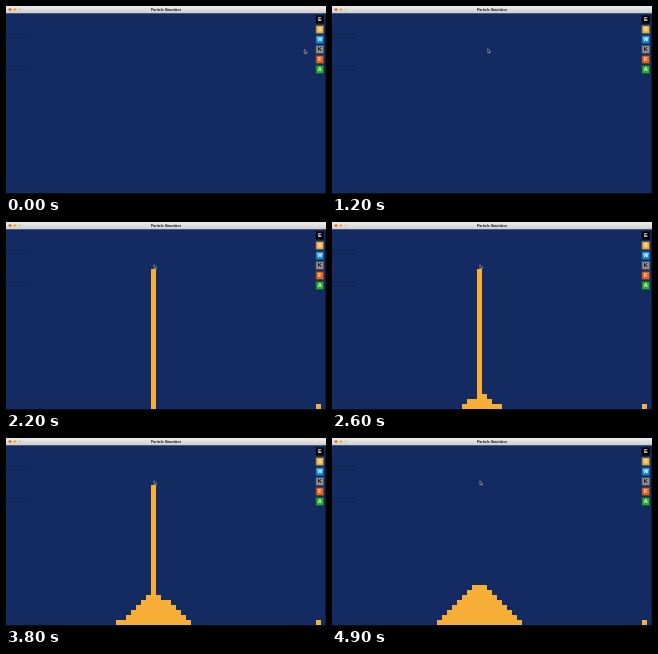
Recreate the animation shown at these times as an HTML page with a canvas. Size 320x188 px, loop 5 s.

```html
<!DOCTYPE html>
<html lang="en">
<head>
<meta charset="utf-8">
<title>Particle Simulator</title>
<style>
  html, body { margin: 0; width: 100%; height: 100%; overflow: hidden; background: #142b62; }
  canvas { display: block; width: 320px; height: 188px; }
</style>
</head>
<body>
<canvas id="stage"></canvas>
<script>
const LOOP = 5000, TICK = 100;
const CELL = 5, FLOOR = 187, LEFT = 90, COLS = 24;
const SPOUT_COL = 11, SPOUT_ROW = 28;
const POUR_START = 1260, POUR_END = 3925, STEP = 100 / 3;
const SAND = '#f6ae37';
const FONT = '"Liberation Sans", sans-serif';

const POINTER = [
  [100, 298.3, 43.4],
  [500, 314, 23.6],
  [700, 314, 23.6],
  [1100, 178, 42.7],
  [1250, 148, 42.7]
];

const BUTTONS = [
  ['E', '#000000', '#ffffff'],
  ['S', '#edb343', '#fff3d0'],
  ['W', '#1c8fe3', '#ffffff'],
  ['K', '#929292', '#0c0c0c'],
  ['F', '#e9641f', '#fff0e0'],
  ['A', '#2bb02f', '#ffffff']
];

const canvas = document.getElementById('stage');
const ctx = canvas.getContext('2d');
const ratio = window.devicePixelRatio || 1;
canvas.width = 320 * ratio;
canvas.height = 188 * ratio;
ctx.scale(ratio, ratio);

function seeded(seed) {
  return () => {
    seed = (seed * 16807) % 2147483647;
    return seed / 2147483647;
  };
}

function pointerAt(t) {
  const i = POINTER.findIndex(k => k[0] > t);
  if (i < 1) return POINTER.at(i).slice(1);
  const [t0, x0, y0] = POINTER[i - 1], [t1, x1, y1] = POINTER[i];
  const p = (t - t0) / (t1 - t0), e = p * p * (3 - 2 * p);
  return [x0 + (x1 - x0) * e, y0 + (y1 - y0) * e];
}

// A grain rolls down one side until the next column is no lower.
function dropGrain(heights, random) {
  let col = SPOUT_COL + (random() < 0.5 ? 0 : 1);
  const lower = dir => heights[col + dir] < heights[col];
  let dir = random() < 0.5 ? -1 : 1;
  if (!lower(dir)) dir = -dir;
  while (lower(dir)) col += dir;
  heights[col]++;
}

function sandAt(t) {
  const steps = since => Math.max(0, Math.floor((t - since) / STEP));
  const poured = steps(POUR_START) - steps(POUR_END);
  const top = SPOUT_ROW - steps(POUR_END);
  const front = SPOUT_ROW - steps(POUR_START);
  const heights = Array(COLS).fill(0);
  const random = seeded(2024);
  const landed = () => poured - Math.max(0, top - heights[SPOUT_COL]);
  for (let n = 0; n < landed(); n++) dropGrain(heights, random);
  return { heights, top, front };
}

function rect(x, y, w, h, color) {
  ctx.fillStyle = color;
  ctx.fillRect(x, y, w, h);
}

function text(str, x, y, size, color) {
  ctx.font = `bold ${size}px ${FONT}`;
  ctx.fillStyle = color;
  ctx.textAlign = 'center';
  ctx.textBaseline = 'middle';
  ctx.fillText(str, x, y);
}

function drawWindow() {
  rect(0, 0, 320, 188, '#142b62');
  for (const y of [28, 31, 60, 63]) rect(0, y, 23, 1, 'rgba(5,14,45,.28)');
  rect(0, 187, 320, 1, '#080f26');
  rect(319.5, 7, 0.5, 181, '#080f26');

  const bar = ctx.createLinearGradient(0, 0, 0, 7);
  bar.addColorStop(0, '#eeeeec');
  bar.addColorStop(1, '#cfcfcd');
  rect(0, 0, 320, 7, bar);
  rect(0, 7, 320, 0.5, '#7c8090');
  ['#f0694f', '#f3b13f', '#cfd0c8'].forEach((color, i) => {
    ctx.fillStyle = color;
    ctx.beginPath();
    ctx.arc(4 + i * 5, 3.5, 1.6, 0, Math.PI * 2);
    ctx.fill();
  });
  text('Particle Simulator', 160, 3.6, 3.55, '#111111');
}

function drawButtons() {
  ctx.strokeStyle = 'rgba(10,16,35,.5)';
  ctx.lineWidth = 0.6;
  BUTTONS.forEach(([letter, color, ink], i) => {
    const y = 9.5 + i * 10;
    rect(309.8, y, 8, 8, color);
    ctx.strokeRect(310.1, y + 0.3, 7.4, 7.4);
    text(letter, 313.8, y + 4.2, 5.6, ink);
  });
}

function drawSand(t) {
  if (t < POUR_START) return;
  rect(310, 182, CELL, CELL, SAND);
  const { heights, top, front } = sandAt(t);
  const stack = (col, low, high) => {
    if (high > low) rect(LEFT + col * CELL, FLOOR - high * CELL, CELL, (high - low) * CELL, SAND);
  };
  heights.forEach((h, col) => stack(col, 0, h));
  stack(SPOUT_COL, Math.max(0, front), top);
}

function drawPointer(x, y) {
  ctx.beginPath();
  [[0, 0], [0, 4], [0.9, 3.3], [1.5, 4.6], [2.2, 4.3], [1.6, 3], [2.8, 2.9]]
    .forEach(([dx, dy]) => ctx.lineTo(x + dx, y + dy));
  ctx.closePath();
  ctx.fillStyle = '#080808';
  ctx.fill();
  ctx.strokeStyle = '#d4d8e2';
  ctx.lineWidth = 0.5;
  ctx.stroke();
}

function draw(now) {
  const t = Math.floor((now % LOOP) / TICK) * TICK;
  drawWindow();
  drawButtons();
  drawSand(t);
  drawPointer(...pointerAt(t));
}

const start = performance.now();
function frame() {
  draw(Math.max(0, performance.now() - start));
  requestAnimationFrame(frame);
}
frame();
</script>
</body>
</html>
```
